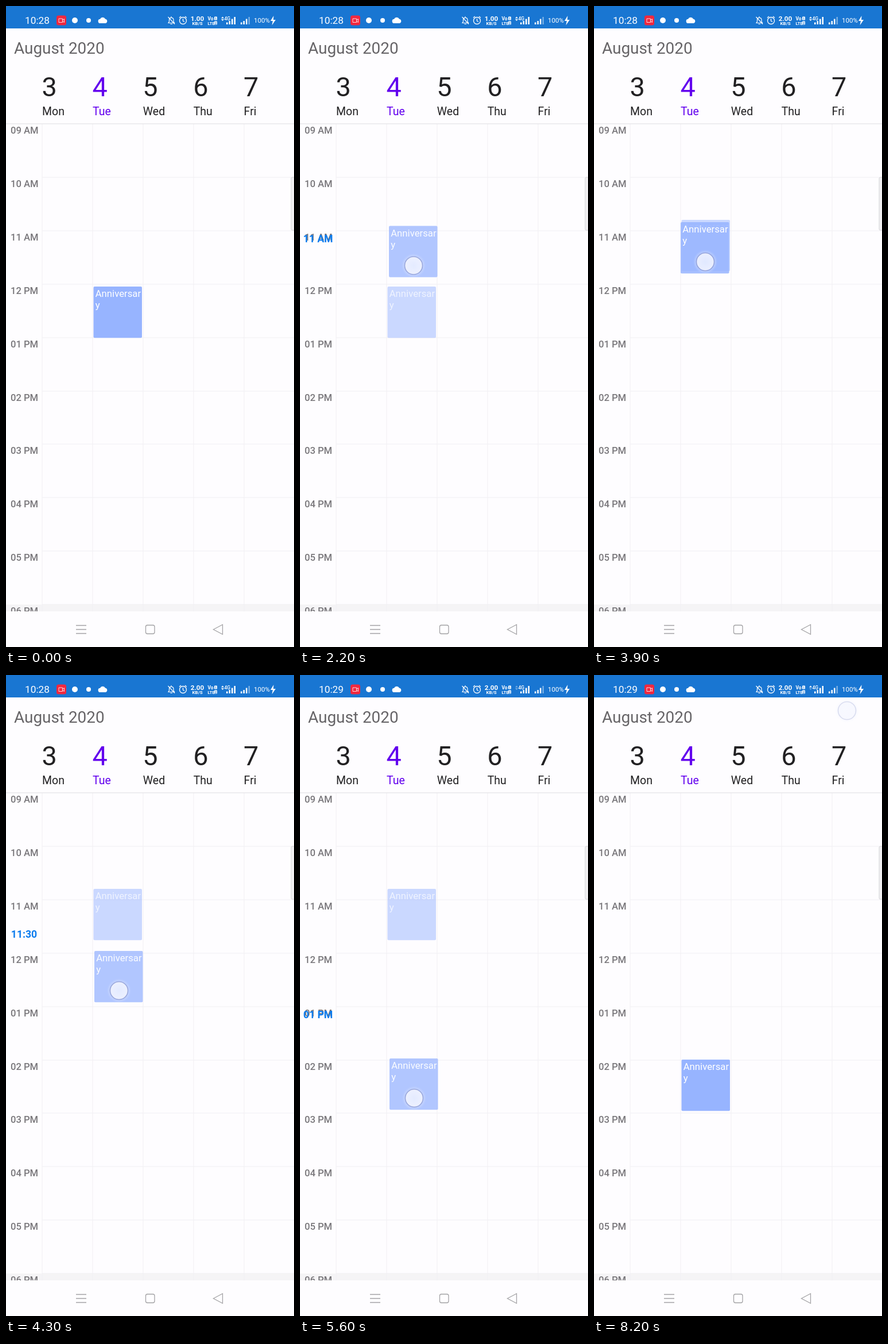
An HTML page with a canvas for the animation above (8300 ms loop, 502 by 1115 pixels).

```html
<!DOCTYPE html>
<html lang="en">
<head>
<meta charset="utf-8">
<title>Calendar drag</title>
<style>
  html, body { margin: 0; width: 100%; height: 100%; overflow: hidden; background: #fefdff; }
  canvas { display: block; width: 502px; height: 1115px; }
</style>
</head>
<body>
<canvas id="stage"></canvas>
<script>
const W = 502, H = 1115, LOOP = 8300, STEP = 100;
const PAPER = '#fefdff', EVENT = '#97b4ff';
const COL = 63, COL_W = 87.9, TOP = 205, HOUR = 92.9, NAV = 1053;

const canvas = document.getElementById('stage');
const g = canvas.getContext('2d');
const dpr = window.devicePixelRatio || 1;
canvas.width = W * dpr;
canvas.height = H * dpr;

// Finger: time, x, y, opacity
const touch = [
  [900, 186, 533, 0], [1100, 186, 533, 1], [1600, 186, 533, 1], [2000, 196, 463, 1],
  [2100, 196, 463, 1], [2200, 198, 451.5, 1], [2600, 194, 442, 1], [2700, 194, 441, 1],
  [2900, 194, 441, 0], [3400, 194, 444, 0], [3600, 194, 444, 1], [3900, 194, 445, 1],
  [4300, 197, 549, 1], [4800, 199, 631, 1], [5200, 199, 684, 1], [5600, 199, 736, 1],
  [6100, 199, 736, 1], [6400, 199, 736, 0], [7900, 441, 62, 0], [8200, 441, 62, 0.45]
];
const drags = [[1400, 2800], [3900, 6200]];
// Dragged time shown in the hour column
const hints = [
  [0, 0], [1700, 11.5], [2200, 11], [2800, 0], [4000, 11], [4300, 11.5],
  [4500, 12], [4700, 12.5], [5300, 13], [5900, 13.5], [6200, 0]
];
const slots = [[0, 488], [2800, 372], [6200, 669]];

const hourY = h => TOP + (h - 9) * HOUR;
const pad = n => String(n).padStart(2, '0');
const latest = (keys, t) => keys.filter(k => k[0] <= t).pop()[1];

function tween(keys, t) {
  const i = keys.findIndex(k => k[0] >= t);
  if (i <= 0) return keys[i < 0 ? keys.length - 1 : 0].slice(1);
  const a = keys[i - 1], b = keys[i], p = (t - a[0]) / (b[0] - a[0]);
  return a.slice(1).map((v, n) => v + (b[n + 1] - v) * p);
}

function hourName(h) {
  const n = pad((Math.floor(h) + 11) % 12 + 1);
  return h % 1 ? n + ':30' : n + (h < 12 ? ' AM' : ' PM');
}

function text(s, x, y, size, color, weight = 400, align = 'left') {
  g.font = `${weight} ${size}px Roboto, sans-serif`;
  g.textAlign = align;
  g.fillStyle = color;
  g.fillText(s, x, y);
}

function rect(x, y, w, h, color) {
  g.fillStyle = color;
  g.fillRect(x, y, w, h);
}

function round(x, y, w, h, r) {
  g.beginPath();
  g.roundRect(x, y, w, h, r);
}

function disc(x, y, r, color) {
  g.beginPath();
  g.arc(x, y, r, 0, 7);
  g.fillStyle = color;
  g.fill();
}

function path(d, color, width) {
  const p = new Path2D(d);
  if (width) {
    g.strokeStyle = color;
    g.lineWidth = width;
    g.stroke(p);
  } else {
    g.fillStyle = color;
    g.fill(p);
  }
}

function bars(x, dimLast) {
  [3.5, 6, 9.5, 13].forEach((h, i) =>
    rect(x + i * 4.5, 32 - h, 2.5, h, dimLast && i === 3 ? 'rgba(255,255,255,.4)' : '#fff'));
}

function statusBar(t) {
  rect(0, 0, W, 39, '#1976d2');
  text(t < 4400 ? '10:28' : '10:29', 33, 31, 17.3, '#fff');

  round(88, 16.5, 17, 17, 3.5);
  g.fillStyle = '#f0283f';
  g.fill();
  path('M92 22h6.5v6.5h-6.5zM98.5 24.5l3-2v6l-3-2', '#ffd8dc', 1);
  disc(120, 25, 5, '#fff');
  disc(144, 25, 4, '#fff');
  path('M164.500 30a3.600 3.600 0 0 1-.5-7.200a5 5 0 0 1 9-.4a3.900 3.900 0 0 1 .5 7.600z', '#fff');

  path('M283 29.500h10.500l-1.500-2.500v-3.500a3.800 3.800 0 0 0-7.500 0v3.500zM286.500 31.500h3.500M288 18v2M282.500 19l11.500 12.500', '#fff', 1.2);
  path('M314.500 25.500a6 6 0 1 1-12 0a6 6 0 1 1 12 0M308.500 22v4l2.500 1.500M302 20.500l3-2.500M315 20.500l-3-2.500', '#fff', 1.3);

  text(t < 3300 ? '1.00' : '2.00', 333.5, 26, 11.7, '#fff', 700, 'center');
  text('KB/S', 333.5, 33.3, 8, '#fff', 700, 'center');
  text('Vo', 351.5, 25, 8.5, '#fff', 700);
  text('LTE', 351.5, 32.5, 7.5, '#fff', 700);
  [18.5, 26.5].forEach((y, i) => {
    round(363, y, 5, 6, 1);
    g.fillStyle = '#fff';
    g.fill();
    text(i + 1, 365.5, y + 5.2, 5.5, '#1976d2', 700, 'center');
  });

  const idle = t >= 5500 && t < 6600;
  const arrow = idle ? 'rgba(255,255,255,.4)' : '#fff';
  path('M375 21.500l2.500-3l2.500 3z', arrow);
  path('M375 23l2.500 3l2.500-3z', t >= 7800 ? 'rgba(255,255,255,.35)' : arrow);
  text('4G', 380.5, 25, 8.5, '#fff', 500);
  bars(384, false);
  bars(409, true);
  text('100%', 432, 29.3, 11.5, '#fff');
  path('M466.500 17l-5.500 9h4l-1.500 7.500l6.500-9.500h-4z', '#fff');
}

function header() {
  text('August 2020', 14, 83, 27.9, '#666467');
  ['Mon', 'Tue', 'Wed', 'Thu', 'Fri'].forEach((day, i) => {
    const x = COL + i * COL_W, color = i === 1 ? '#6200ee' : '#212022';
    text(i + 3, x - 0.5, 157.3, 46.8, color);
    text(day, x, 189.7, 19.5, color);
  });
}

function grid() {
  rect(0, hourY(18), W, NAV - hourY(18), '#f5f4f6');
  for (let h = 9; h <= 18; h++) {
    const y = hourY(h);
    if (h > 9) rect(COL, Math.round(y) - 0.5, W - COL, 1, '#f1f0f3');
    text(hourName(h), 8, y + 17, 16.6, '#79777b', 500);
  }
  for (let i = 0; i < 5; i++) rect(Math.round(COL + i * COL_W) - 0.5, TOP, 1, NAV - TOP, '#f1f0f3');
  rect(0, TOP - 0.7, W, 1.2, '#e4e3e6');

  round(497, 298, 8, 92, 2);
  g.fillStyle = '#f1f0f2';
  g.fill();
  g.strokeStyle = '#d6d5d8';
  g.lineWidth = 1;
  g.stroke();
}

function navBar() {
  rect(0, NAV, W, H - NAV, PAPER);
  const ink = '#a3a2a5';
  path('M122 1077.500h18M122 1084.500h18M122 1091.500h18', ink, 1.3);
  round(243.5, 1077, 15.5, 15, 3);
  g.strokeStyle = ink;
  g.stroke();
  path('M361.500 1084.500l16-8.500v17z', ink, 1.3);
}

function eventCard(x, y, alpha) {
  g.save();
  g.globalAlpha = alpha;
  round(x, y, 84.5, 89.3, 2);
  g.fillStyle = EVENT;
  g.fill();
  g.restore();
  g.save();
  g.globalAlpha = Math.min(1, alpha + 0.2);
  text('Anniversar', x + 3.2, y + 18, 16.74, '#fff');
  text('y', x + 3.2, y + 38, 16.74, '#fff');
  g.restore();
}

function finger(x, y, alpha) {
  if (alpha <= 0) return;
  g.save();
  g.globalAlpha = alpha;
  const glow = g.createRadialGradient(x, y, 15, x, y, 21);
  glow.addColorStop(0, 'rgba(225,232,255,.45)');
  glow.addColorStop(1, 'rgba(225,232,255,0)');
  disc(x, y, 21, glow);
  const fill = g.createRadialGradient(x, y, 0, x, y, 15);
  fill.addColorStop(0, 'rgba(246,248,255,.62)');
  fill.addColorStop(1, 'rgba(246,247,255,.8)');
  disc(x, y, 15, fill);
  g.beginPath();
  g.arc(x, y, 15.5, 0, 7);
  g.strokeStyle = 'rgba(95,110,175,.45)';
  g.lineWidth = 1.6;
  g.stroke();
  g.restore();
}

function draw(t) {
  const [x, y, alpha] = tween(touch, t);
  const drag = drags.find(d => t >= d[0] && t < d[1]);
  const hint = latest(hints, t);

  g.setTransform(dpr, 0, 0, dpr, 0, 0);
  rect(0, 0, W, H, PAPER);
  grid();
  eventCard(152.5, latest(slots, t), drag ? 0.5 : 1);
  if (hint) text(hourName(hint), 31.5, hourY(hint) + 20, 17.6, '#0c7cee', 700, 'center');
  // The lifted card settles from nearly solid to translucent
  if (drag) eventCard(x - 43, y - 69, t - drag[0] < STEP ? 0.85 : 0.74);
  navBar();
  header();
  statusBar(t);
  finger(x, y, alpha);
}

const start = performance.now();
function tick() {
  const t = (performance.now() - start) % LOOP;
  draw(Math.floor(t / STEP) * STEP);
  requestAnimationFrame(tick);
}
tick();
</script>
</body>
</html>
```
